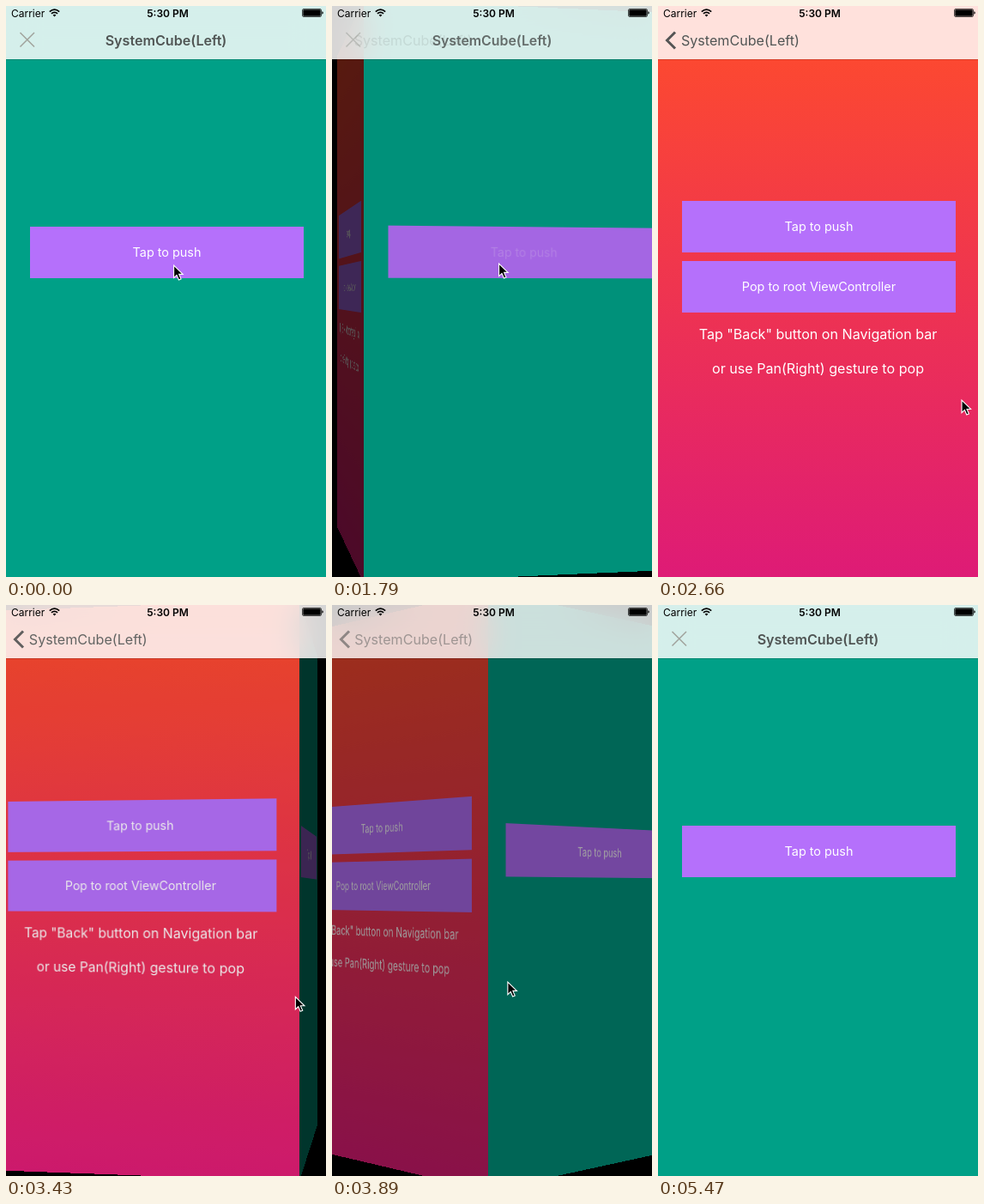
These frames come from a looping animation (373 by 665 pixels, 6730 ms). An HTML page:

```html
<!DOCTYPE html>
<html lang="en">
<head>
<meta charset="utf-8">
<title>Cube transition</title>
<style>
html, body { margin: 0; width: 100%; height: 100%; overflow: hidden; background: #000; }
#stage { position: relative; width: 373px; height: 665px; overflow: hidden; background: #000;
  font: 16.1px Inter, "Open Sans", sans-serif; }
#stage div, #stage svg { position: absolute; }
.face, .shade { inset: 0; }
.face { backface-visibility: hidden; color: #fff; }
#first { background: #00a087; }
#second { background: linear-gradient(#ff4d2a, #de1b76); }
.shade { background: #000; }
.button { left: 28px; width: 319px; height: 60px; background: #b570fb;
  font-size: 14.4px; line-height: 60px; text-align: center; }
.label { left: 0; width: 373px; line-height: 40px; text-align: center; }
#bar { left: 0; top: 0; width: 373px; height: 62px; backdrop-filter: blur(18px);
  box-shadow: 0 1px rgba(0, 0, 0, .15); }
#title, #back { top: 20px; line-height: 40px; color: #505554; white-space: nowrap; }
#title { left: 0; width: 373px; text-align: center; font-weight: 600; }
#back { left: 27px; }
.status { top: 0; line-height: 17px; font-size: 12px; color: #000; }
#stage svg { left: 0; top: 0; overflow: visible; fill: none; }
</style>
</head>
<body>
<div id="stage">
  <div class="face" id="first">
    <div class="button" style="top:256.5px"><span id="tapText">Tap to push</span></div>
    <div class="shade"></div>
  </div>
  <div class="face" id="second">
    <div class="button" style="top:226.5px">Tap to push</div>
    <div class="button" style="top:296.5px">Pop to root ViewController</div>
    <div class="label" style="top:362px">Tap "Back" button on Navigation bar</div>
    <div class="label" style="top:402px">or use Pan(Right) gesture to pop</div>
    <div class="shade"></div>
  </div>
  <div id="bar"></div>
  <div id="title">SystemCube(Left)</div>
  <div id="back">SystemCube(Left)</div>
  <div class="status" style="left:6px">Carrier</div>
  <div class="status" style="left:0;width:377px;text-align:center;font-weight:600">5:30 PM</div>
  <svg width="373" height="665">
    <path id="close" d="M16.5 31L33 47.5M33 31L16.5 47.5" stroke="#a0a29c" stroke-width="1.5"/>
    <path id="chevron" d="M20 30.5L10.5 40L20 49.5" stroke="#555" stroke-width="3"/>
    <g stroke="#000" stroke-width="1.7">
      <path d="M50.8 6.6Q56.5 1.6 62.2 6.6M52.9 8.9Q56.5 5.7 60.1 8.9"/>
      <path d="M56.5 12.4L54.6 10.4Q56.5 8.9 58.4 10.4Z" fill="#000" stroke="none"/>
    </g>
    <rect x="345.5" y="3.5" width="22" height="9" rx="1.5" stroke="#000" stroke-width=".7"/>
    <rect x="346.3" y="4.3" width="20.4" height="7.4" rx=".8" fill="#000"/>
    <path d="M368.4 6.3q1.4 .3 1.4 1.7t-1.4 1.7z" fill="#000"/>
    <path id="cursor" d="M.6 1V15.6L4 12.4L6.4 18L9 16.9L6.6 11.4H11.2Z"
      fill="#000" stroke="#fff" stroke-width="1.1"/>
  </svg>
</div>
<script>
const LOOP = 6730, TICK = 1000 / 15, HALF = 373 / 2, DEPTH = 1550;
const PUSH_START = 1665.8, PUSH_TIME = 569, POP_START = 3290, RELEASE = 4467;
const el = id => document.getElementById(id);
const clamp = v => Math.max(0, Math.min(1, v));
const ramp = (t, from, to) => clamp((t - from) / (to - from));
const smooth = u => u * u * (3 - 2 * u);

// Cubic Bezier (.25, .1, .25, 1)
function ease(u) {
  let lo = 0, hi = 1;
  const bezier = (s, a, b) => 3 * s * (1 - s) * (a * (1 - s) + b * s) + s ** 3;
  for (let i = 0; i < 24; i++) {
    const mid = (lo + hi) / 2;
    if (bezier(mid, .25, .25) < u) lo = mid; else hi = mid;
  }
  return bezier(lo, .1, 1);
}

// Linear track of [time, ...values] keys
function track(keys, t) {
  let i = 1;
  while (i < keys.length - 1 && t > keys[i][0]) i++;
  const [a, b] = [keys[i - 1], keys[i]], u = ramp(t, a[0], b[0]);
  return a.slice(1).map((v, k) => v + (b[k + 1] - v) * u);
}

const dragKeys = [[POP_START, 0], [3600, .303], [3980, .6], [4070, .62], [4400, .9045], [RELEASE, .96], [4690, 1]];
const dragPoint = p => [372 - 328 * p, 460 - 43 * p];

function cursorPoint(t, drag) {
  if (t < 60) return [195, 301];
  if (t < 420) return [195, 300];
  if (t < 2330) return [194, 299];
  if (t < 2660) {
    const u = smooth(ramp(t, 2330, 2666));
    return [194 + 159 * u, 299 + 159 * u];
  }
  if (t < POP_START) return track([[2660, 353, 458], [2960, 372, 460]], t);
  if (t < RELEASE) return dragPoint(drag);
  const [x, y] = dragPoint(.96), u = smooth(ramp(t, RELEASE, 5410));
  return [x + (284 - x) * u, y + (611 - y) * u];
}

function poseFace(id, angle) {
  const face = el(id);
  face.style.transform =
    `perspective(${DEPTH}px) translateZ(${-HALF}px) rotateY(${angle}deg) translateZ(${HALF}px)`;
  face.style.visibility = Math.abs(angle) > 89.9 ? "hidden" : "visible";
  face.querySelector(".shade").style.opacity = .75 * Math.abs(angle) / 90;
}

function render(time) {
  const raw = time % LOOP;
  const t = Math.floor((raw + 8) / TICK) * TICK;
  const popping = t >= POP_START;
  const drag = track(dragKeys, t)[0];
  const p = popping ? 1 - drag : ease(ramp(t, PUSH_START, PUSH_START + PUSH_TIME));

  poseFace("first", 90 * p);
  poseFace("second", 90 * p - 90);
  el("tapText").style.opacity = t >= PUSH_START && !popping ? .2 : 1;

  // The bar thins shortly before the pop settles
  const white = .835 - 1.2 * drag ** 4 * (1 - drag);
  el("bar").style.background = `rgba(255, 255, 255, ${white})`;
  el("title").style.opacity = (1 - p) ** (popping ? 14 : 1.2);
  el("title").style.transform = `scale(${1 - .03 * clamp(p * 4)})`;
  el("back").style.opacity = p;
  el("back").style.transform = `translateX(${-1.5 * (1 - p)}px)`;
  el("chevron").style.opacity = p ** (popping ? .7 : 8);
  el("close").style.opacity = popping ? ramp(t, 4500, 5000) : (1 - p) ** 4;

  const [x, y] = cursorPoint(t < 1000 ? raw : t, drag);
  el("cursor").setAttribute("transform", `translate(${x} ${y})`);
  el("cursor").style.visibility = raw < 5470 ? "visible" : "hidden";
}

const start = performance.now();
function loop() {
  render(performance.now() - start);
  requestAnimationFrame(loop);
}
loop();
</script>
</body>
</html>
```
